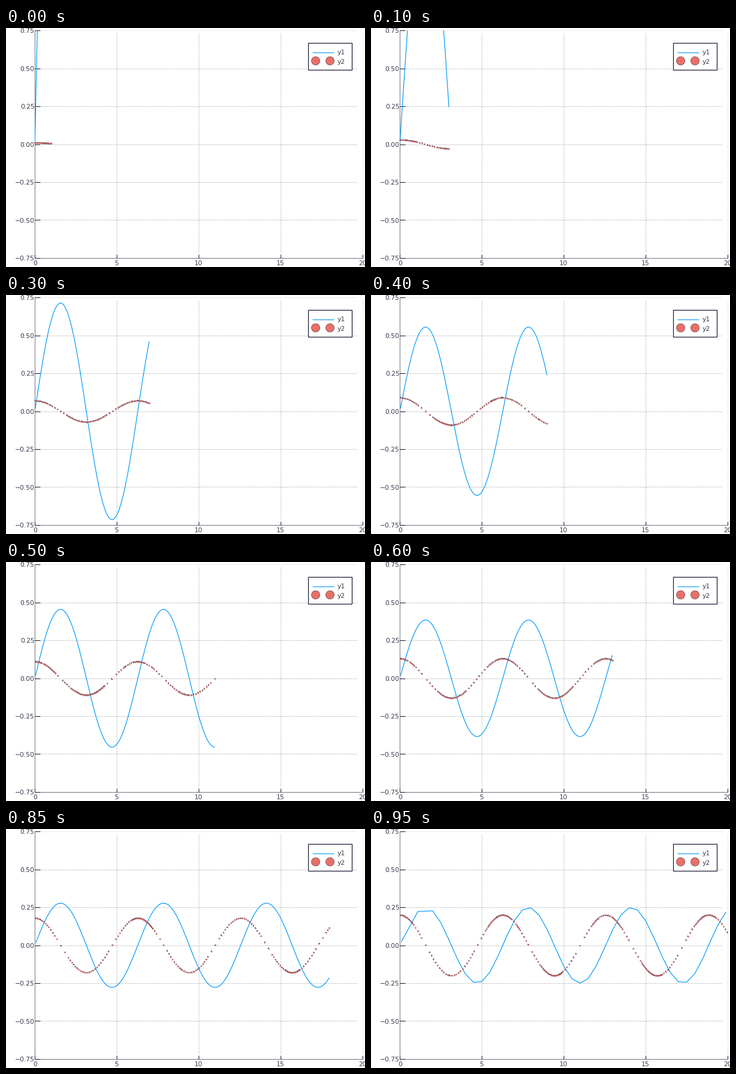
These frames come from a looping animation (600 by 400 pixels, 1 s). A matplotlib script:

```python
import random

import matplotlib.pyplot as plt
import numpy as np
from matplotlib.animation import FuncAnimation
from matplotlib.patches import Circle, Rectangle

DPI = 100
PX = 72 / DPI  # points per pixel
FRAMES = 20
LEFT, RIGHT, TOP, BOTTOM = 48, 596, 4, 385
NAVY = "#15152f"
BLUE = "#009afa"
RED = "#e8706a"

plt.rcParams["font.family"] = "DejaVu Sans"

fig = plt.figure(figsize=(6, 4), dpi=DPI, facecolor="white")
ax = fig.add_axes([0, 0, 1, 1])
ax.set(xlim=(0, 600), ylim=(400, 0))
ax.axis("off")


def to_px(x):
    return 48.2 + 27.38 * np.asarray(x)


def to_py(y):
    return 194.6 - 253.6 * np.asarray(y)


def segment(x0, y0, x1, y1, color=NAVY, width=1.0, **style):
    ax.plot([x0, x1], [y0, y1], color=color, lw=width * PX,
            solid_capstyle="butt", **style)


def label(x, y, text, ha):
    ax.text(x, y, text, ha=ha, va="baseline", fontsize=10.8 * PX,
            color=NAVY, alpha=0.85, zorder=8)


def grid_line(x0, y0, x1, y1, alpha):
    segment(x0, y0, x1, y1, "black", alpha=alpha, ls=(0, (1, 1.5)), zorder=1)


def draw_axes():
    for value in np.arange(-0.75, 1, 0.25):
        y = float(to_py(value))
        if value > -0.75:
            grid_line(LEFT + 9, y, 587, y, 0.22 if value == 0.75 else 0.4)
        segment(LEFT, y, LEFT + 8.5, y, zorder=2)
        label(LEFT - 0.3, y + 4.1, f"{value:.2f}".replace("-", "\u2212"),
              "right")
    for value in range(0, 21, 5):
        x = float(to_px(value))
        if value:
            grid_line(x, 9, x, 377, 0.22 if value == 20 else 0.4)
        segment(x, BOTTOM - 6, x, BOTTOM, zorder=2)
        label(x, 397.3, str(value), "center")
    segment(LEFT, TOP, LEFT, BOTTOM, alpha=0.6, zorder=2)
    segment(LEFT, BOTTOM, RIGHT, BOTTOM, alpha=0.6, zorder=2)


def draw_legend():
    ax.add_patch(Rectangle((505, 25), 73, 45, fc="white", ec=NAVY,
                           lw=1.2 * PX, zorder=6))
    segment(511.5, 40.6, 547.5, 40.6, BLUE, 1.1, zorder=7)
    for x in (517.5, 541.5):
        ax.add_patch(Circle((x, 55), 7, fc=RED, ec="#6b3a40",
                            lw=0.7 * PX, zorder=7))
    label(554, 44.3, "y1", "left")
    label(554, 60.3, "y2", "left")


def refine(a, b, tolerance):
    """Split an interval until the cosine bends little inside it."""
    h = b - a
    bend = np.mean(np.abs(np.cos(np.linspace(a, b, 5))))
    if h * h * bend < tolerance or h < 0.02:
        return [a]
    mid = (a + b) / 2
    return refine(a, mid, tolerance) + refine(mid, b, tolerance)


def dot_positions(end):
    rng = random.Random(end)
    knots = [end / 20 * (k + rng.uniform(-0.1, 0.1)) for k in range(1, 20)]
    knots = [0.0025 * end, *knots, 0.9985 * end]
    points = []
    for a, b in zip(knots, knots[1:]):
        points += refine(a, b, rng.uniform(0.008, 0.02))
    return np.array(points + knots[-1:])


def curve_positions(end):
    if end < FRAMES:
        return np.linspace(0.004 * end, 0.9975 * end, 400)
    # The longest curve is sampled so coarsely that its corners show.
    return np.r_[0.1, 1.1, np.arange(2, 19.6, 0.5), 19.9]


draw_axes()
draw_legend()

plot_area = Rectangle((LEFT, TOP), RIGHT - LEFT + 0.5, BOTTOM - TOP,
                      transform=ax.transData)
curve, = ax.plot([], [], color=BLUE, lw=1.2 * PX, zorder=3)
rims, = ax.plot([], [], "o", ms=1.9 * PX, color=NAVY, mew=0, zorder=4)
dots, = ax.plot([], [], "o", ms=1.9 * PX, color=RED, mew=0.3 * PX,
                mec="#8d3f42", zorder=5)
curve.set_clip_path(plot_area)


def update(frame):
    end = frame + 1
    x = curve_positions(end)
    curve.set_data(to_px(x), to_py(np.sin(x) / (0.2 * end)))

    x = dot_positions(end)
    px, py = to_px(x), to_py(0.01 * end * np.cos(x))
    rims.set_data(px - 0.2, py - 0.4)
    dots.set_data(px + 0.1, py + 0.2)
    return curve, rims, dots


anim = FuncAnimation(fig, update, frames=FRAMES, interval=50,
                     repeat=True, repeat_delay=0, blit=False)
plt.show()
```
